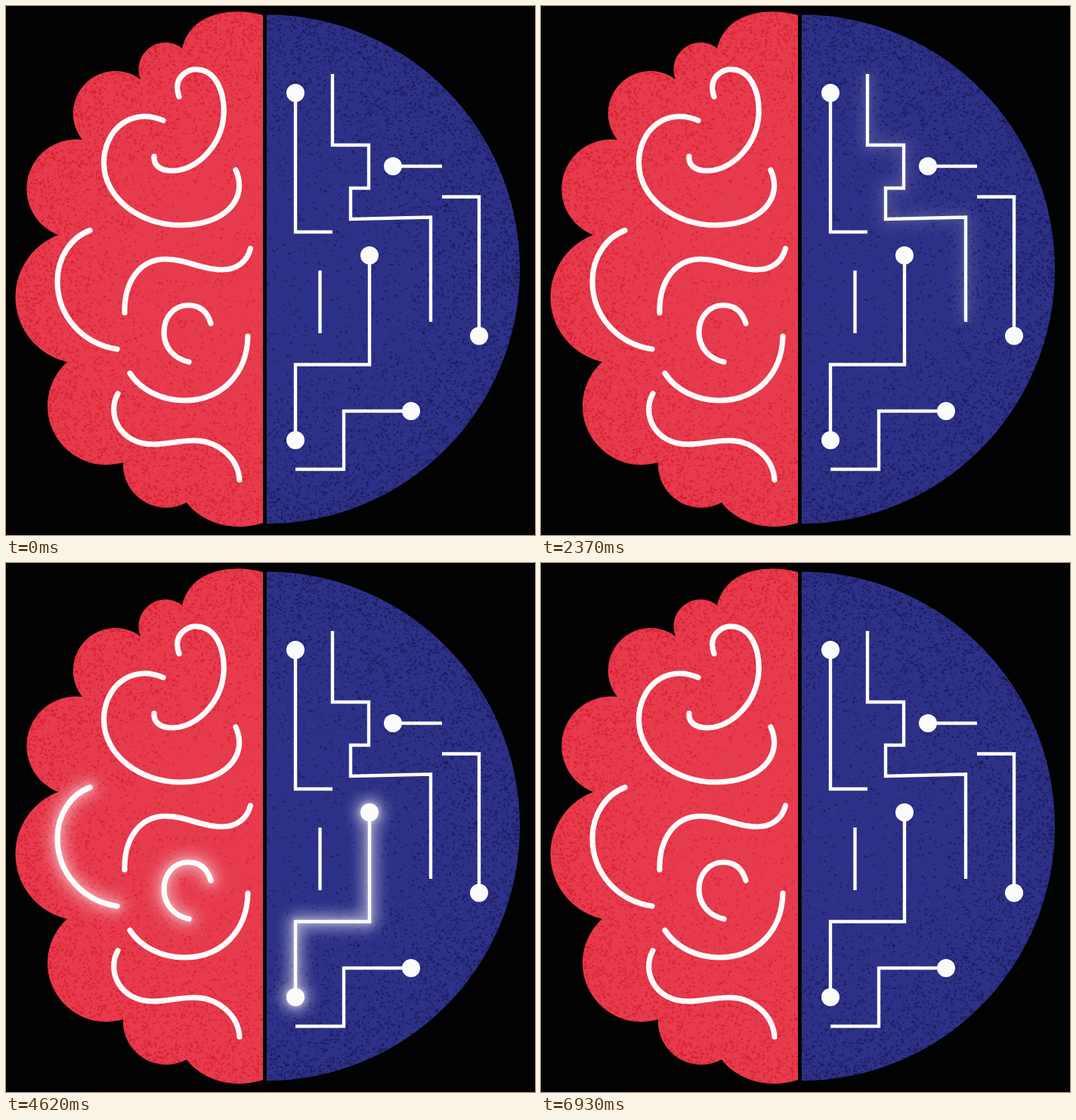
An HTML page with a canvas for the animation above (6960 ms loop, 700 by 700 pixels).

```html
<!DOCTYPE html>
<html lang="en">
<head>
<meta charset="utf-8">
<title>Brain and circuit</title>
<style>
  html, body { margin: 0; width: 100%; height: 100%; overflow: hidden; background: #020202; }
  canvas, svg { position: absolute; inset: 0; width: 100%; height: 100%; display: block; }
</style>
</head>
<body>
<canvas id="base" width="700" height="700"></canvas>
<svg id="lines" viewBox="0 0 700 700" fill="none" stroke="#fcfbfc">
  <defs>
    <filter id="halo" filterUnits="userSpaceOnUse" x="0" y="0" width="700" height="700">
      <feGaussianBlur stdDeviation="9.5"/>
    </filter>
    <filter id="core" filterUnits="userSpaceOnUse" x="0" y="0" width="700" height="700">
      <feGaussianBlur stdDeviation="3"/>
    </filter>
    <clipPath id="brainClip"><path id="brainShape"/></clipPath>
    <clipPath id="chipClip"><path id="chipShape"/></clipPath>
  </defs>
</svg>
<script>
const LOOP = 6960, STEP = 30;

const BRAIN = 'M340 12C305 2 245 5 233 56A35.5 35.5 0 0 0 178 97A56 56 0 0 0 101 177' +
  'A65.5 65.5 0 0 0 69 303A88 88 0 0 0 81 471A78 78 0 0 0 155 604' +
  'A57 57 0 0 0 239 657C256 680 295 698 340 684Z';
const CHIP = 'M345 11.5A335 336.75 0 0 1 345 685Z';

// glow: [start, end] in ms
const folds = [
  { d: 'M229 120C220 95 240 83 252 84C278 84 290 115 288 145C285 185 252 218 220 218C203 218 195 210 196 199', glow: [0, 960] },
  { d: 'M208 151.5C165 133 129 165 129.5 208C130 255 178 290 231 290C290 290 321 255 304 217', glow: [740, 2040] },
  { d: 'M157 406C156 365 177 335 211 335C240 335 258 349 285 349C306 349 319 338 323.5 321', glow: [2450, 3700] },
  { d: 'M111 297C86 306 68 333 68 364C68 410 101 447 147 454', glow: [3640, 4950] },
  { d: 'M271 420C266 403 255 396 241 396C222 396 209 412 209 432C209 452 223 467 242 471', glow: [3640, 4950] },
  { d: 'M164 486C178 508 206 522 236 522C286 522 319 486 320 437' },
  { d: 'M148 513C133 540 150 580 195 580C215 580 228 575 248 575C281 575 307 598 309 627', glow: [5240, 6470] }
];
const traces = [
  { d: 'M512 212H577', dots: [[512, 212]], glow: [0, 760] },
  { d: 'M383 115V299H432', dots: [[383, 115]], glow: [640, 1650] },
  { d: 'M432 90V184H480V241H456V282L562 279.5V418', dots: [], glow: [1480, 2510] },
  { d: 'M577 252.5H626V437', dots: [[626, 436.5]], glow: [2350, 3360] },
  { d: 'M481 330V474.5H383V575', dots: [[481, 330], [383, 574.5]], glow: [4330, 5250] },
  { d: 'M415.5 350V433', dots: [], glow: [5190, 6050] },
  { d: 'M383 613H447V536H536', dots: [[536, 536]], glow: [5880, 6930] }
];

function seeded(seed) {
  return () => {
    seed = (seed * 1664525 + 1013904223) >>> 0;
    return seed / 4294967296;
  };
}

function paintHalf(ctx, outline, fill, ink, x0, rand) {
  const speck = n => {
    for (let i = 0; i < n; i++) {
      const x = x0 + rand() * 340, y = rand() * 700;
      const r = Math.hypot(x - 342, y - 348) / 340;
      const density = 0.1 + 0.9 * Math.max(0, (r - 0.3) / 0.7) ** 1.6;
      if (rand() > density) continue;
      ctx.fillRect(x, y, 1.3 + rand() * 2, 1.3 + rand() * 1.6);
    }
  };
  const shape = new Path2D(outline);
  ctx.save();
  ctx.fillStyle = fill;
  ctx.fill(shape);
  ctx.clip(shape);
  ctx.fillStyle = ink;
  ctx.globalAlpha = 0.65;
  speck(14000);
  ctx.globalAlpha = 0.14;
  for (let i = 0; i < 14000; i++) ctx.fillRect(x0 + rand() * 340, rand() * 700, 1.2, 1.2);
  ctx.restore();
}

const svg = document.getElementById('lines');

function add(parent, tag, attrs) {
  const node = document.createElementNS('http://www.w3.org/2000/svg', tag);
  for (const key in attrs) node.setAttribute(key, attrs[key]);
  return parent.appendChild(node);
}

function drawItem(parent, item, width, radius) {
  add(parent, 'path', { d: item.d, 'stroke-width': width });
  for (const [cx, cy] of item.dots || []) {
    add(parent, 'circle', { cx, cy, r: radius, fill: '#fcfbfc', stroke: 'none' });
  }
}

const glows = [];

function build(items, clip, cap, width, haloWidth, coreWidth) {
  for (const item of items.filter(i => i.glow)) {
    const group = add(svg, 'g', { 'clip-path': `url(#${clip})`, 'stroke-linecap': cap });
    drawItem(add(group, 'g', { filter: 'url(#halo)', opacity: 0.85 }), item, haloWidth, 18);
    drawItem(add(group, 'g', { filter: 'url(#core)', opacity: 0.8 }), item, coreWidth, 13);
    glows.push({ group, span: item.glow });
  }
  const top = add(svg, 'g', { 'stroke-linecap': cap });
  for (const item of items) drawItem(top, item, width, 12);
}

function pulse(t, [start, end]) {
  if (t <= start || t >= end) return 0;
  return Math.sin(Math.PI * (t - start) / (end - start)) ** 2;
}

function render(time) {
  const t = Math.floor(time % LOOP / STEP) * STEP;
  for (const { group, span } of glows) {
    const level = pulse(t, span);
    group.style.display = level ? '' : 'none';
    group.style.opacity = level;
  }
}

document.getElementById('brainShape').setAttribute('d', BRAIN);
document.getElementById('chipShape').setAttribute('d', CHIP);
const ctx = document.getElementById('base').getContext('2d');
paintHalf(ctx, BRAIN, '#e73b4e', '#d71d2b', 0, seeded(7));
paintHalf(ctx, CHIP, '#2e3188', '#191a55', 345, seeded(23));
build(folds, 'brainClip', 'round', 7.2, 22, 11);
build(traces, 'chipClip', 'butt', 4.4, 16, 5.5);

const origin = performance.now();
function frame() {
  render(performance.now() - origin);
  requestAnimationFrame(frame);
}
frame();
</script>
</body>
</html>
```
